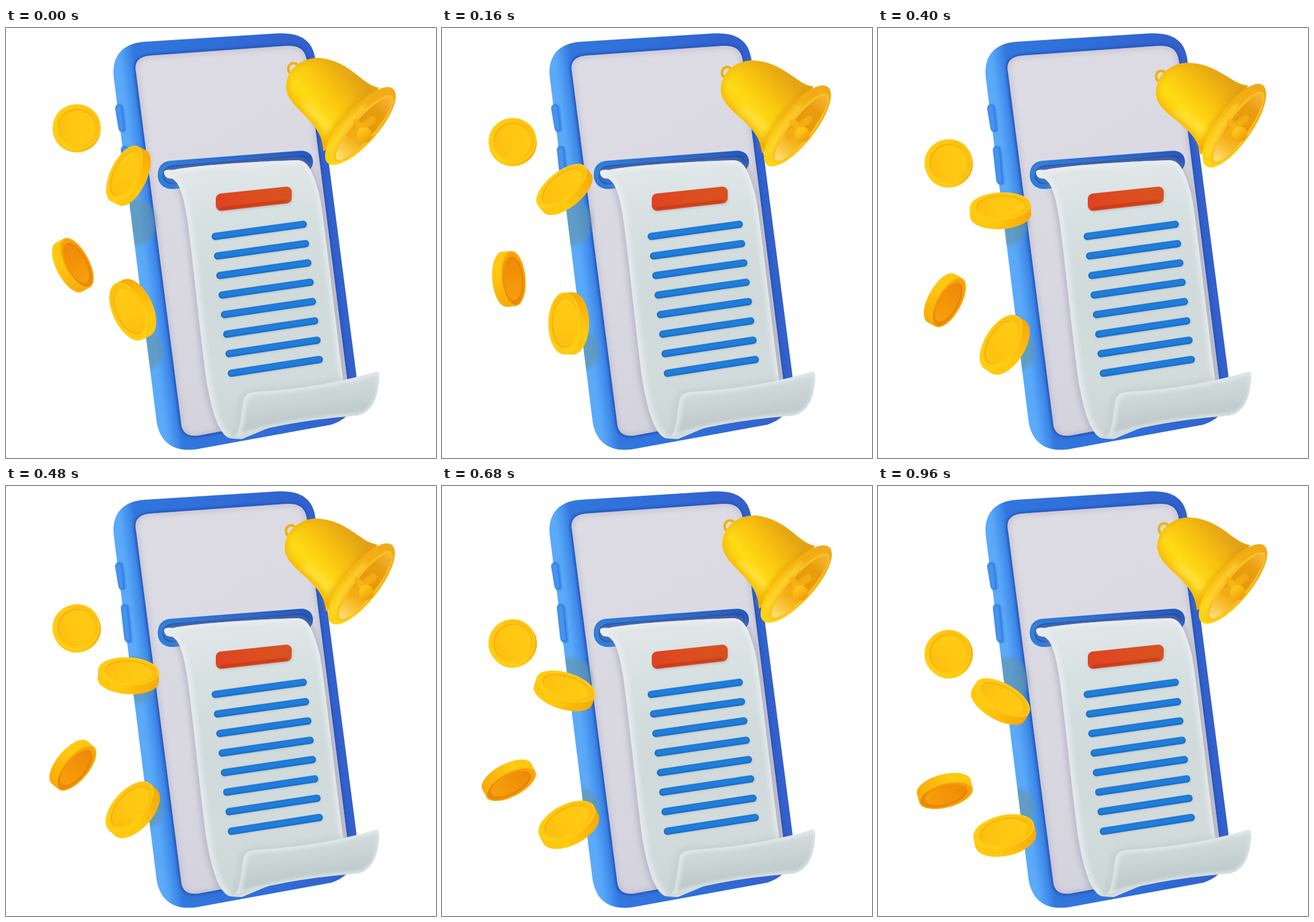
Animation, 748 px wide and 748 px high, one loop 1000 ms. Source, as an HTML page with a canvas:

```html
<!DOCTYPE html>
<html>
<head>
<meta charset="utf-8">
<style>
html, body { margin: 0; height: 100%; overflow: hidden; background: #fff; }
canvas { display: block; width: 100vw; height: 100vh; }
</style>
</head>
<body>
<canvas id="stage" width="748" height="748"></canvas>
<script>
const SIZE = 748, LOOP = 1000, STEP = 40;
const ctx = document.getElementById('stage').getContext('2d');
const scene = document.createElement('canvas');
scene.width = scene.height = SIZE;

// Motion keys
const TIMES = [0, 80, 240, 400, 600, 800, 960];
const FALL = [0, 12, 36, 61, 90, 110.7, 118];
const SWING = [0, -2, -4.6, -6.6, 2, -2, -2];
const COINS = [
  { x: 123, y: 174.5, r: 41.5, b: 39.5, d: 5, turn: [0, -3, -10, -20, -35, -45, -50] },
  { x: 213, y: 257, r: 53, b: 24, d: 16, turn: [-64, -52, -26, -3, 11, 26, 30] },
  { x: 116.3, y: 412.5, r: 48, b: 21, d: 16, dark: true, turn: [62, 73, 97, 119, 145, 160, 165] },
  { x: 220.5, y: 490, r: 54, b: 28, d: 15, turn: [-115, -102, -78, -58, -35, -20, -13] }
];

// Smooth curve through the keys that never overshoots a turning point
function along(keys, t) {
  const last = TIMES.length - 1;
  const slope = i => (keys[i + 1] - keys[i]) / (TIMES[i + 1] - TIMES[i]);
  const tangent = i => {
    if (i === 0) return slope(0);
    if (i === last) return slope(last - 1);
    const a = slope(i - 1), b = slope(i);
    return a * b > 0 ? (a + b) / 2 : 0;
  };
  let i = 0;
  while (i < last - 1 && t >= TIMES[i + 1]) i++;
  const h = TIMES[i + 1] - TIMES[i], u = Math.min(1, (t - TIMES[i]) / h), v = 1 - u;
  return keys[i] * v * v * (1 + 2 * u) + keys[i + 1] * u * u * (3 - 2 * u)
    + h * u * v * (v * tangent(i) - u * tangent(i + 1));
}

function linear(g, x0, y0, x1, y1, ...stops) {
  const grad = g.createLinearGradient(x0, y0, x1, y1);
  stops.forEach((s, i) => Array.isArray(s)
    ? grad.addColorStop(s[0], s[1])
    : grad.addColorStop(i / (stops.length - 1), s));
  return grad;
}

// Filled shape; each edge is a soft inner stroke [color, width, blur, dx, dy]
function shape(g, d, fill, ...edges) {
  const path = new Path2D(d);
  g.fillStyle = fill;
  g.fill(path);
  for (const [color, width, blur, dx = 0, dy = 0] of edges) {
    g.save();
    g.clip(path);
    g.filter = `blur(${blur}px)`;
    g.translate(dx, dy);
    g.strokeStyle = color;
    g.lineWidth = width;
    g.stroke(path);
    g.restore();
  }
}

function soft(g, d, color, width, blur, dx = 0, dy = 0) {
  g.save();
  g.filter = `blur(${blur}px)`;
  g.translate(dx, dy);
  g.strokeStyle = color;
  g.lineWidth = width;
  g.lineCap = g.lineJoin = 'round';
  g.stroke(new Path2D(d));
  g.restore();
}

function oval(g, x, y, rx, ry, deg, fill) {
  g.beginPath();
  g.ellipse(x, y, rx, ry, deg * Math.PI / 180, 0, 7);
  g.fillStyle = fill;
  g.fill();
}

const BODY = 'M187 82C185 48 203 27 240 24L470 9.5C510 7 533 20 538 54L609 600C614 640 609 676 566 690L330 733C290 738 268 720 262 685Z';
const SCREEN = 'M226 76C223 58 232 50 250 48L488 31C510 30 520 38 523 55L592 600L600 660L334 709C316 711 307 704 305 690Z';

function drawPhone(g) {
  shape(g, BODY,
    linear(g, 187, 82, 524, 40, [0, '#5cabf8'], [.04, '#5aa8f8'], [.08, '#4592ee'], [.12, '#3277dd'], [.5, '#2f6fda'], [1, '#3360cc']));
  soft(g, SCREEN, '#2656b9', 6, 2);
  shape(g, SCREEN, linear(g, 240, 60, 570, 650, '#dddce4', '#dad9e2', '#d3d2dc'),
    ['rgba(175,174,196,.7)', 6, 4]);
  for (const d of [
    'M190 139Q191 134 196 133Q202 133 203 139L207 175Q207 180 202 180Q197 180 196 175Z',
    'M200 211Q201 206 206 206Q212 206 213 212L218 267Q218 272 213 272Q207 271 206 265Z'
  ]) {
    soft(g, d, 'rgba(40,110,215,.6)', 2, 1, 1, 0);
    shape(g, d, '#4495ee', ['rgba(40,112,220,.7)', 3, 1, -1, 0]);
  }
  // Coin shadows resting on the phone
  g.save();
  g.clip(new Path2D(BODY));
  g.filter = 'blur(3px)';
  oval(g, 225, 338, 36, 40, 0, 'rgba(100,148,165,.6)');
  oval(g, 243, 561, 30, 35, 0, 'rgba(100,148,165,.6)');
  g.restore();
}

function drawSlot(g) {
  const d = 'M286 231L512 213.5C526 213 534 221 534 232C534 244 527 250 514 252L292 280C276 281 264 272 264 256C264 241 272 232 286 231Z';
  shape(g, d, linear(g, 264, 0, 534, 0, '#2a80de', '#2869d0', '#2658bd'));
  shape(g, 'M290 239L512 221.5C522 221 527 226 527 233C527 240 522 244 513 245L293 272C280 273 272 266 272 256C272 246 279 240 290 239Z',
    linear(g, 0, 222, 0, 274, '#2450ab', '#265cc0', '#2a70d2'), ['rgba(26,66,150,.8)', 3, 1.5]);
}

function drawPaper(g) {
  const body = 'M275 252C274 247 280 246 290 247C330 238 460 231 508 230C526 231 534 250 545 290C553 330 562 420 586 608L590 640L410 715L392 714C372 712 358 670 348 610C334 500 325 400 315 330C308 285 300 268 289 262C278 262 276 257 275 252Z';
  g.save();
  g.clip(new Path2D(SCREEN));
  soft(g, body, 'rgba(140,140,160,.5)', 8, 5);
  g.restore();
  shape(g, body, linear(g, 390, 235, 440, 715, '#e1e7e9', '#d5dfdf', '#d0dada', '#d3dcdc', '#cbd5d5'),
    ['rgba(236,241,243,.75)', 12, 4, 1, 0]);

  const bar = 'M374 297L488 285V296L374 309Z';
  soft(g, bar, 'rgba(160,172,176,.6)', 18, 2, 1, 2);
  g.lineJoin = g.lineCap = 'round';
  g.lineWidth = 18;
  g.strokeStyle = g.fillStyle = linear(g, 365, 0, 497, 0, '#e04222', '#dc4e1f', '#d8511f');
  g.stroke(new Path2D(bar));
  g.fill(new Path2D(bar));
  soft(g, 'M374 314L488 301', 'rgba(185,45,25,.6)', 4, 1.5);

  for (let i = 0; i < 8; i++) {
    const x = 364 + 4 * i, d = `M${x} ${362.6 + 34 * i}L${x + 153} ${341.6 + 33.6 * i}`;
    soft(g, d, 'rgba(160,174,182,.6)', 12, 1.5, 1, 1.5);
    soft(g, d, '#1a6bc2', 12.5, .3);
    soft(g, d, '#1f7edb', 9.5, 1, 0, -.8);
  }

  const curl = 'M392 714C410 708 408 665 414 645C416 637 424 634 434 633C520 628 590 614 643 598C649 597 650 601 649 612C647 645 636 668 612 674C540 680 462 690 392 714Z';
  g.save();
  g.clip(new Path2D(body));
  soft(g, curl, 'rgba(180,194,197,.6)', 6, 5, -3, 0);
  g.restore();
  shape(g, curl, linear(g, 520, 620, 530, 692, '#d3dcdc', '#cbd5d5', '#c3cecf', '#b9c5c7'),
    ['rgba(230,237,238,.75)', 9, 3, 2, 0]);
}

function drawBell(g, deg) {
  g.save();
  g.translate(613, 140);
  g.rotate(deg * Math.PI / 180);
  g.translate(-613, -140);
  g.lineWidth = 4.5;
  g.strokeStyle = '#eeb30b';
  g.beginPath();
  g.ellipse(500, 71, 9, 10, 0, 0, 7);
  g.stroke();
  shape(g, 'M545 52C520 51 489 66 487 102C489 142 552 160 552 214L600 190L648 104C618 98 600 58 545 52Z',
    linear(g, 508, 148, 604, 70, '#fdc90c', '#ffdb16', '#fac80f', '#efb411', '#e0a018'),
    ['rgba(236,172,10,.5)', 10, 4]);
  soft(g, 'M522 136Q548 156 560 176', 'rgba(255,236,110,.7)', 9, 6);
  soft(g, 'M553 204Q575 160 640 107', 'rgba(222,150,10,.6)', 7, 4);

  oval(g, 616.5, 170.5, 86, 31, -48.6, linear(g, 555, 235, 677, 105, '#ffd60f', '#fcc510', '#f4b012', '#f0a91a'));
  soft(g, 'M565 213Q586 172 624 137', 'rgba(255,228,80,.7)', 7, 4);
  oval(g, 622, 174.5, 75, 21, -48.6, '#fbc024');
  oval(g, 622.5, 175, 71, 17.5, -48.6, linear(g, 575, 228, 670, 118, '#ffe27a', '#f8b824', '#e59a0c', '#e89c0e', '#f8b838'));
  soft(g, 'M601 186L637 160', '#f3ac12', 13, 1);
  soft(g, 'M610 164L624 183', '#f6b315', 11, 1);
  oval(g, 624, 186, 13, 13, 0, linear(g, 616, 176, 632, 198, '#ffcb1e', '#f9b310', '#e99a06'));
  g.restore();
}

function drawCoin(g, c, t) {
  const { r, b, d } = c;
  g.save();
  g.translate(c.x, c.y + along(FALL, t));
  g.rotate(along(c.turn, t) * Math.PI / 180);
  const side = linear(g, -r, 0, r, 0, '#ffc60e', '#ffca10', '#fdb90b', '#f6aa08');
  for (let y = d / 2; y >= -d / 2; y--) oval(g, 0, y, r, b, 0, side);
  g.translate(0, -d / 2);
  const tones = c.dark ? ['#f9a30c', '#f39409', '#e98808'] : ['#ffcc14', '#ffc712', '#fcbd10'];
  oval(g, 0, 0, r, b, 0, c.dark ? '#ffb414' : '#ffd21c');
  oval(g, 0, 0, r - 2, b - 1.5, 0, linear(g, -r, 0, r, 0, ...tones));
  oval(g, 0, 0, r * .79, b * .79, 0, c.dark ? '#df7e06' : '#f2ad0e');
  oval(g, .6, 1.2, r * .77, b * .765, 0, linear(g, -r, 0, r, 0, ...tones.slice().reverse()));
  g.restore();
}

const still = scene.getContext('2d');
still.fillStyle = '#fff';
still.fillRect(0, 0, SIZE, SIZE);
drawPhone(still);
drawSlot(still);
drawPaper(still);

const start = performance.now();
let shown = -1;
function tick(now) {
  const t = Math.floor(Math.max(0, now - start) % LOOP / STEP) * STEP;
  if (t !== shown) {
    shown = t;
    ctx.drawImage(scene, 0, 0);
    drawBell(ctx, along(SWING, t));
    for (const c of COINS) drawCoin(ctx, c, t);
  }
  requestAnimationFrame(tick);
}
tick(start);
</script>
</body>
</html>
```
